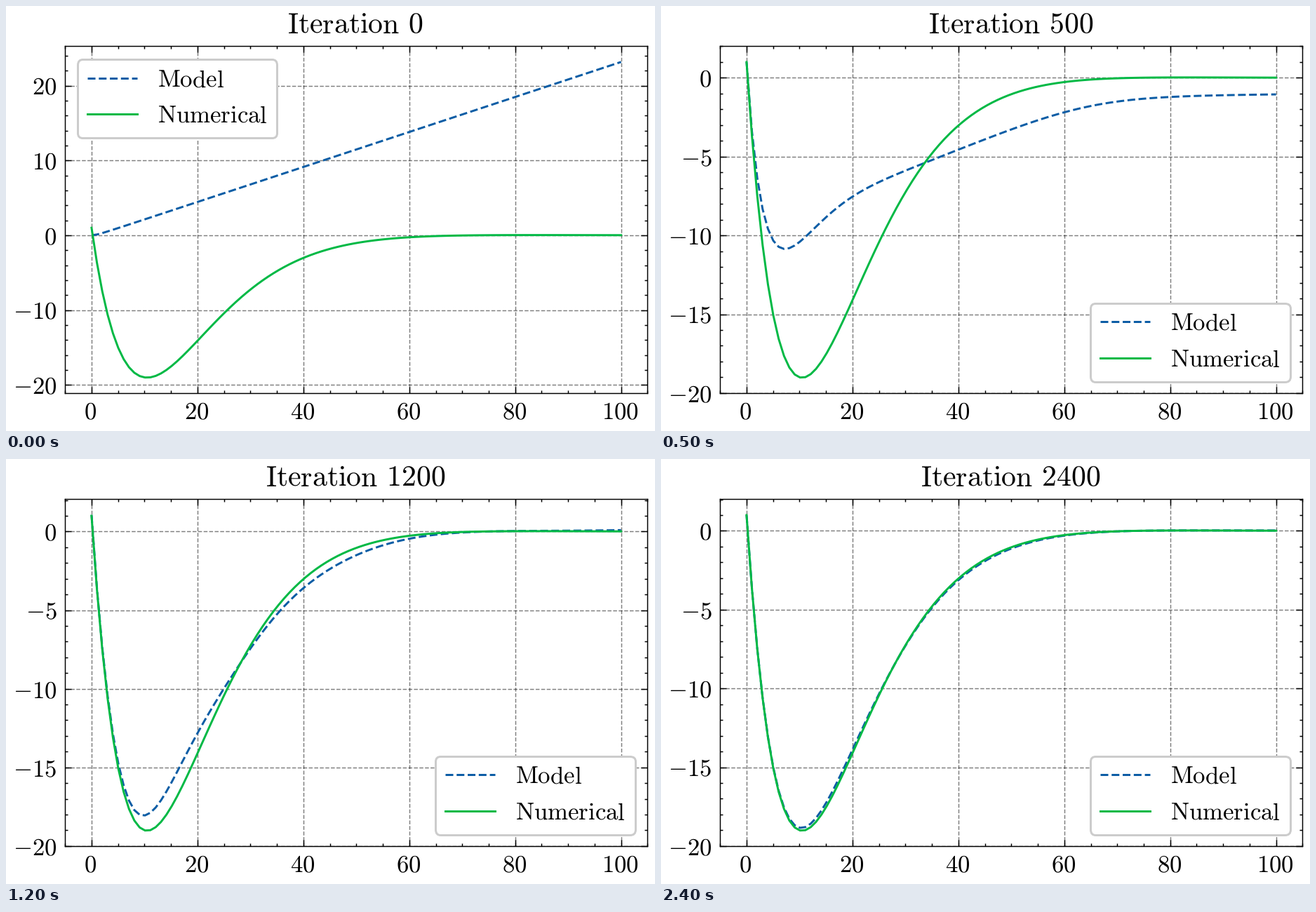
A matplotlib script that plays this animation: 925x606 px, repeating every 2500 ms.

```python
import matplotlib.pyplot as plt
import numpy as np
from matplotlib.animation import FuncAnimation
from matplotlib.transforms import ScaledTranslation

W, H, DPI = 925, 606, 200
K = 1.0715          # size of one style point in figure points
PX = 72 / DPI       # one pixel in points
FRAMES, STEP = 25, 100
BLUE, GREEN = "#0C5DA5", "#00B945"

plt.rcParams.update({
    "font.family": "Liberation Serif",
    "mathtext.fontset": "cm",
    "text.hinting": "none",
    "font.size": 11.7 * K,
    "axes.titlesize": 14.04 * K,
    "axes.titlepad": 6 * K,
    "axes.linewidth": 0.5 * K,
    "axes.axisbelow": True,
    "axes.grid": True,
    "grid.color": "k",
    "grid.alpha": 0.5,
    "grid.linestyle": "--",
    "grid.linewidth": 0.5 * K,
    "lines.linewidth": 1.0 * K,
    "patch.linewidth": 1.0 * K,
    "legend.fontsize": 12 * K,
    "legend.framealpha": 1.0,
    "legend.labelspacing": 0.53,
    "legend.borderpad": 0.385,
})
for axis, far in (("xtick", "top"), ("ytick", "right")):
    plt.rcParams.update({
        f"{axis}.direction": "in",
        f"{axis}.{far}": True,
        f"{axis}.minor.visible": True,
        f"{axis}.major.size": 3 * K,
        f"{axis}.minor.size": 1.5 * K,
        f"{axis}.major.width": 0.5 * K,
        f"{axis}.minor.width": 0.5 * K,
        f"{axis}.major.pad": 12 * PX,
    })


def rm(text):
    words = [rf"\mathrm{{{w}}}" for w in text.split()]
    return "$" + r"\hspace{0.38}".join(words) + "$"


def damped(decay, freq, a, b):
    return np.exp(-decay * t) * (a * np.cos(freq * t) - b * np.sin(freq * t))


def bump(center, width):
    return np.exp(-((t - center) / width) ** 2)


def blend(a, b, s, rate):
    """Move from a to b, slowing down exponentially."""
    return a + (b - a) * np.expm1(-rate * s) / np.expm1(-rate)


t = np.linspace(0, 100, 100)
exact = damped(0.0907, 0.043, 1, 115.1)

# Stages of the fit: rising line, shallow dip, dip with a straight ramp,
# then the exact curve plus a shrinking error.
start = 0.234 * (np.sqrt(t ** 2 + 1) - 1)
early = (-4.02 + 0.0142 * t - 2.5e-5 * t ** 2
         + (5.02 - 3.8 * t) * np.exp(-0.36 * t))
ramp = 0.05 - 1.491 * np.log1p(np.exp((64.5 - t) / 7))
middle = ramp + damped(0.19, 0.15, 14.7, 16.3)
error = 1.62 * bump(16.5, 9) - 0.58 * bump(42, 17) + 0.08 * (t / 100) ** 8


def model(n):
    if n <= 300:
        return blend(start, early, n / 300, 4)
    if n <= 700:
        return blend(early, middle, (n - 300) / 400, 1)
    if n <= 1200:
        return blend(middle, exact + error, (n - 700) / 500, 2.2)
    return exact + error * (1200 / n) ** 2.5


fig = plt.figure(figsize=(W / DPI, H / DPI), dpi=DPI, facecolor="white")
ax = fig.add_axes([84.2 / W, 53.8 / H, 830.2 / W, 494.9 / H])
line, = ax.plot(t, start, "--", color=BLUE, label=rm("Model"))
ax.plot(t, exact, color=GREEN, label=rm("Numerical"))

ax.set_xticks(range(0, 101, 20))
for axis in (ax.xaxis, ax.yaxis):
    axis.set_major_formatter(lambda v, pos: f"${v:g}$")
nudge = ScaledTranslation(-1.5 / DPI, 0, fig.dpi_scale_trans)
for label in ax.get_xticklabels():
    label.set_transform(label.get_transform() + nudge)

legend = ax.legend(loc="lower right", bbox_to_anchor=(0, -0.0025, 1, 1))
for text in legend.get_texts():
    text.set_fontsize(11.7 * K)


def update(i):
    n = i * STEP
    line.set_ydata(model(n))
    ax.relim()
    ax.autoscale_view()
    legend.set_loc("upper left" if n == 0 else "lower right")
    ax.set_title(rm(f"Iteration {n}"), x=0.499)
    return line,


anim = FuncAnimation(fig, update, frames=FRAMES, interval=100,
                     repeat=True, repeat_delay=0, blit=False)
plt.show()
```
